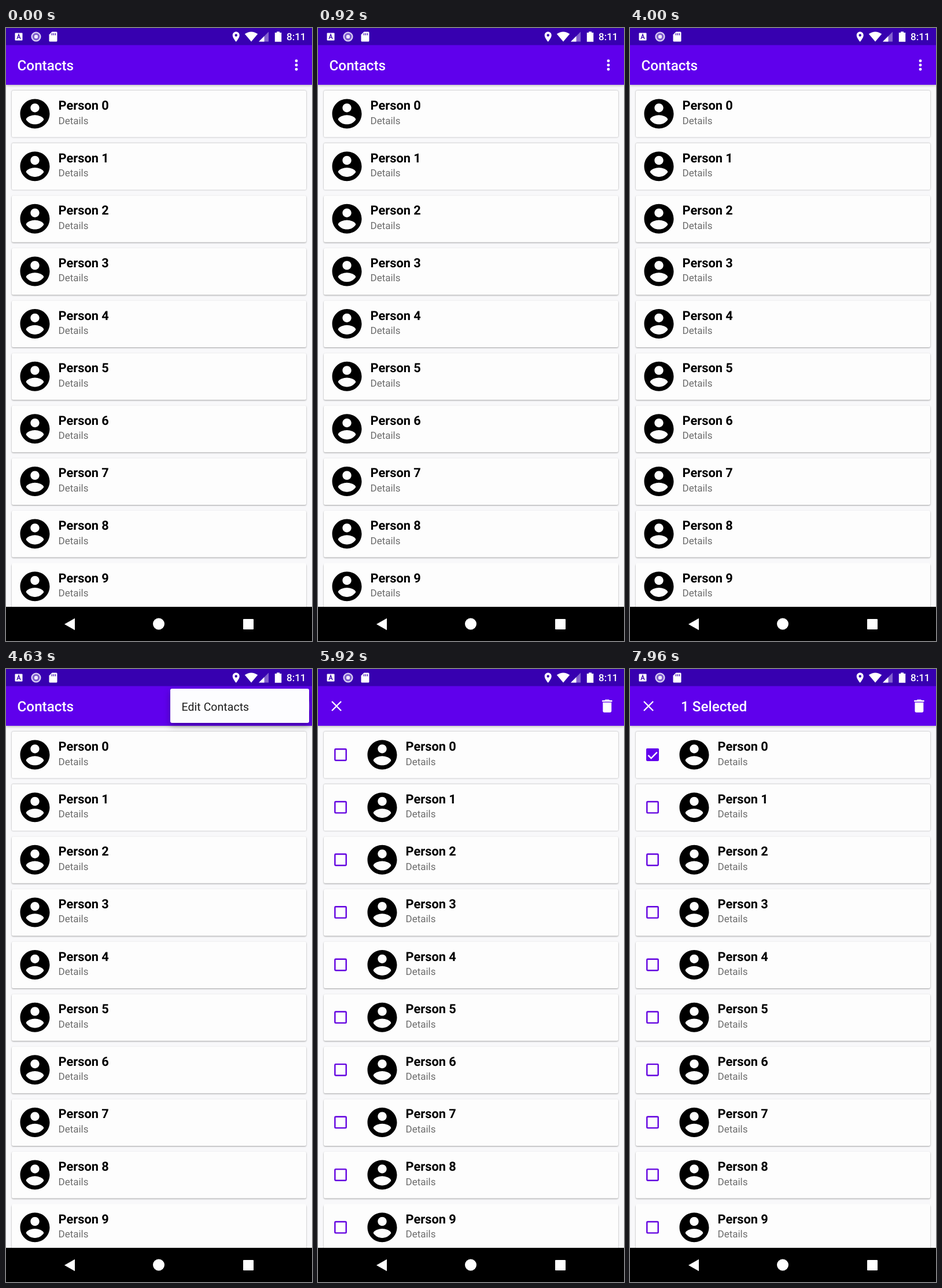
These frames come from a looping animation (529 px wide and 1058 px high, 8000 ms). An HTML page:

```html
<!DOCTYPE html>
<html lang="en">
<head>
<meta charset="utf-8">
<title>Contacts</title>
<style>
html, body { margin: 0; width: 100%; height: 100%; overflow: hidden; background: #f8f8fa; }
svg { display: block; width: 100%; height: 100%; font-family: Roboto, sans-serif; text-rendering: geometricPrecision; }
.title { font-size: 24.25px; font-weight: 500; fill: #fff; }
.name { font-size: 21.8px; font-weight: 700; fill: #000; }
.details { font-size: 17px; fill: #6c6c6c; }
.bar { filter: drop-shadow(0 1.5px 2px rgba(0,0,0,.3)); }
.menu-box { filter: drop-shadow(0 5px 6px rgba(0,0,0,.3)); }

/* One 8 s timeline drives every part: 1% = 80 ms. */
.anim { animation: 8s linear infinite; }
#browse { animation-name: leave; }
#edit { animation-name: enter; }
#people { animation-name: shift; animation-timing-function: step-end; }
#boxes { animation-name: reveal; animation-timing-function: step-end; }
#menu { animation-name: menu; transform-origin: 524px 34px; }
#menuRipple { animation-name: menuRipple; transform-origin: 390px 64px; }
#dotsRipple { animation-name: dotsRipple; transform-origin: 502px 64px; }
#boxRipple { animation-name: boxRipple; transform-origin: 39px 148px; }
#selected { animation-name: select; animation-timing-function: step-end; }
#checkFill { animation-name: checkFill; }
#checkMark { animation-name: checkMark; stroke-dasharray: 1; }

@keyframes leave { 0%, 69.88% { opacity: 1 } 71.8%, 100% { opacity: 0 } }
@keyframes enter { 0%, 69.88% { opacity: 0 } 71.8%, 100% { opacity: 1 } }
@keyframes shift { 0% { transform: none } 69.88%, 100% { transform: translateX(61px) } }
@keyframes reveal { 0% { opacity: 0 } 69.88%, 100% { opacity: 1 } }
@keyframes menu {
  0%, 55% { opacity: 0; transform: scale(.4, .3); animation-timing-function: ease-out }
  57.6%, 69.88% { opacity: 1; transform: none }
  71.25%, 100% { opacity: 0; transform: none }
}
@keyframes menuRipple {
  0%, 66.6% { opacity: 0; transform: scale(.15); animation-timing-function: ease-out }
  68.6%, 100% { opacity: .07; transform: none }
}
@keyframes dotsRipple {
  0%, 53.6% { opacity: 0; transform: scale(.3); animation-timing-function: ease-out }
  55.6% { opacity: .22; transform: none }
  60%, 100% { opacity: 0; transform: none }
}
@keyframes boxRipple {
  0%, 86% { opacity: 0; transform: scale(.3); animation-timing-function: ease-out }
  88.5% { opacity: .14; transform: none }
  93.7%, 100% { opacity: 0; transform: none }
}
@keyframes select { 0% { opacity: 0 } 87.4%, 100% { opacity: 1 } }
@keyframes checkFill { 0%, 87% { opacity: 0 } 88.5%, 100% { opacity: 1 } }
@keyframes checkMark { 0%, 88% { stroke-dashoffset: 1 } 90%, 100% { stroke-dashoffset: 0 } }
</style>
</head>
<body>
<svg viewBox="0 0 529 1058" preserveAspectRatio="none">
  <defs>
    <path id="avatar" transform="translate(19.4 117.4) scale(2.55)" d="M12 2C6.48 2 2 6.48 2 12s4.48 10 10 10 10-4.48 10-10S17.52 2 12 2zm0 3c1.66 0 3 1.34 3 3s-1.34 3-3 3-3-1.34-3-3 1.34-3 3-3zm0 14.2c-2.5 0-4.71-1.28-6-3.22.03-1.99 4-3.08 6-3.08 1.99 0 5.97 1.09 6 3.08-1.29 1.94-3.5 3.22-6 3.22z"/>
    <rect id="box" x="29.3" y="138.3" width="19.4" height="19.4" rx="1.2" fill="none" stroke="#6200e0" stroke-width="2.4"/>
    <clipPath id="menuClip"><rect x="284" y="34" width="240" height="59" rx="3"/></clipPath>
  </defs>

  <rect width="529" height="1058" fill="#f8f8fa"/>
  <g id="cards" fill="#fdfdfd"></g>
  <g id="people" class="anim"></g>
  <g id="boxes" class="anim">
    <circle id="boxRipple" class="anim" cx="39" cy="148" r="24" fill="#6200ee"/>
  </g>
  <g id="checkFill" class="anim">
    <rect x="28" y="137" width="22" height="22" rx="2.4" fill="#6200ee"/>
    <path id="checkMark" class="anim" pathLength="1" d="M31.4 148.8l5.2 5.2 10.2-10.4" fill="none" stroke="#fff" stroke-width="2.4"/>
  </g>

  <rect class="bar" y="29" width="529" height="69" fill="#5f00ec"/>
  <g id="browse" class="anim">
    <text class="title" x="19.5" y="73">Contacts</text>
    <circle id="dotsRipple" class="anim" cx="502" cy="64" r="24" fill="#fff"/>
    <path d="M502 56.7v0M502 64v0M502 71.3v0" stroke="#fff" stroke-width="4.9" stroke-linecap="round"/>
  </g>
  <g id="edit" class="anim">
    <path d="M24 56l16 16M40 56l-16 16" stroke="#fff" stroke-width="2.4"/>
    <path transform="translate(485 49) scale(1.24)" fill="#fff" d="M6 19c0 1.1.9 2 2 2h8c1.1 0 2-.9 2-2V7H6v12zM19 4h-3.5l-1-1h-5l-1 1H5v2h14V4z"/>
    <text id="selected" class="title anim" x="88" y="73">1 Selected</text>
  </g>

  <rect width="529" height="29.5" fill="#3700b0"/>
  <g id="status" fill="#fff">
    <rect x="15.5" y="8.5" width="13" height="13" rx="1"/>
    <path d="M19 19l3-8 3 8M20 16.4h4" fill="none" stroke="#3700b0" stroke-width="1.4"/>
    <circle cx="52" cy="15" r="7.4" fill="#7d5bcd" stroke="#d9cef3" stroke-width="2.4"/>
    <circle cx="52" cy="15" r="3.2" fill="#eee8fa"/>
    <path d="M79.5 6.5H87q1.5 0 1.5 1.5v14q0 1.5-1.5 1.5H76q-1.5 0-1.5-1.5V11.5z"/>
    <path d="M79.5 9v3.5M82.5 9v3.5M85.5 9v3.5" stroke="#3700b0" stroke-width="1.3"/>
    <path fill-rule="evenodd" d="M397.7 6.5c-3.4 0-6 2.6-6 6 0 4.5 6 11.3 6 11.3s6-6.8 6-11.3c0-3.4-2.6-6-6-6zm0 3.8a2.2 2.2 0 1 1 0 4.4 2.2 2.2 0 0 1 0-4.4z"/>
    <path d="M412.8 10.2q11.2-7.6 22.4 0L424 23.6z"/>
    <path d="M454 6.5v17h-17z" opacity=".38"/>
    <path d="M446.5 14v9.5H437z"/>
    <path d="M468 6.3h5v1.8h3.2v15.7h-11.4V8.1h3.2z"/>
    <text x="485" y="21" font-size="17" font-weight="500">8:11</text>
  </g>

  <g id="menu" class="anim">
    <rect class="menu-box" x="284" y="34" width="240" height="59" rx="3" fill="#fdfdff"/>
    <g clip-path="url(#menuClip)"><circle id="menuRipple" class="anim" cx="390" cy="64" r="145"/></g>
    <text x="303.5" y="71.5" font-size="19.4" letter-spacing=".1" fill="#1d1d1d">Edit Contacts</text>
  </g>

  <rect y="999" width="529" height="59"/>
  <g fill="#fff">
    <path d="M101 1029l18-10.2v20.4z"/>
    <circle cx="264" cy="1028.5" r="10"/>
    <rect x="410" y="1020" width="18" height="18" rx="1"/>
  </g>
</svg>
<script>
const rowPitch = 90.63;
const fill = (id, row) => document.getElementById(id).insertAdjacentHTML('beforeend',
  Array.from({ length: 10 }, (_, i) => `<g transform="translate(0 ${i * rowPitch})">${row(i)}</g>`).join(''));

// Shadows deepen towards the bottom of the screen.
fill('cards', i => `<rect x="10" y="108" width="509" height="80.5" rx="2.5"
  style="filter:drop-shadow(0 ${0.7 + i * 0.16}px 1px rgba(0,0,0,.36))"/>`);
fill('people', i => `<use href="#avatar"/><text class="name" x="90.5" y="141">Person ${i}</text>
  <text class="details" x="90.5" y="165.5">Details</text>`);
fill('boxes', () => '<use href="#box"/>');
</script>
</body>
</html>
```
